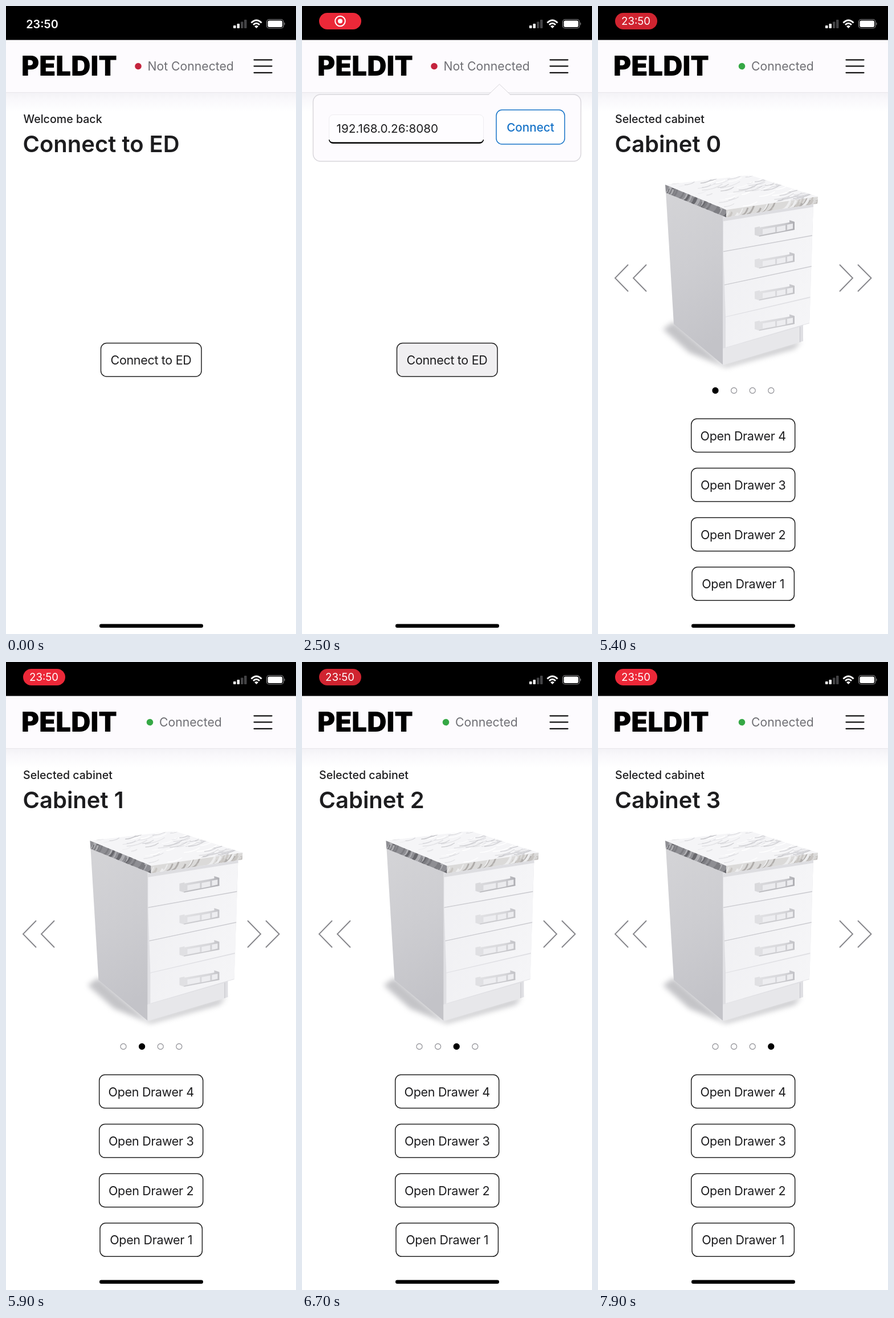
Animation of 509x1100 px, one loop 8 s. Source, as an HTML page:

```html
<!DOCTYPE html>
<html lang="en">
<head>
<meta charset="utf-8">
<title>Cabinet remote</title>
<style>
  html, body { margin: 0; width: 100%; height: 100%; overflow: hidden; background: #fff; }
  svg { display: block; font-family: Inter, Roboto, sans-serif; fill: #1d1d1f; }
  .small { font-size: 19.6px; font-weight: 500; }
  .title { font-size: 40px; font-weight: 600; }
  .label { font-size: 21.5px; letter-spacing: -.015em; text-anchor: middle; }
  .box { fill: #fff; stroke: #222; stroke-width: 1.5; }
  .line { fill: none; stroke: #86868b; stroke-width: 1.9; }
</style>
</head>
<body>
<svg width="509" height="1100" viewBox="0 0 509 1100">
  <defs>
    <linearGradient id="drop" x2="0" y2="1">
      <stop stop-color="#f3f2f6"/><stop offset=".35" stop-color="#f9f8fb"/><stop offset="1" stop-color="#fff"/>
    </linearGradient>
    <linearGradient id="side" x2=".2" y2="1">
      <stop stop-color="#d4d4d7"/><stop offset=".5" stop-color="#cdcdd1"/><stop offset="1" stop-color="#c3c3c8"/>
    </linearGradient>
    <linearGradient id="front" x2="1" y2=".3">
      <stop stop-color="#f0f0f3"/><stop offset="1" stop-color="#f5f5f7"/>
    </linearGradient>
    <linearGradient id="metal" x2="1">
      <stop stop-color="#dadadd"/><stop offset=".7" stop-color="#cacace"/><stop offset="1" stop-color="#adadb2"/>
    </linearGradient>
    <filter id="blur" x="-30%" y="-30%" width="160%" height="160%"><feGaussianBlur stdDeviation="5"/></filter>
    <clipPath id="topClip"><path d="M118 313L266 296L386 334L225 357Z"/></clipPath>
    <clipPath id="edgeClip"><path d="M225 357L386 334L385 346L225 370Z"/></clipPath>
    <clipPath id="leftClip"><path d="M118 313L225 357V370L119 327Z"/></clipPath>
    <g id="handle">
      <path d="M275 388L284 386V404L275 401Z" fill="#d9d9dc"/>
      <path d="M283 388L336 379V375L345 378V392L283 404Z" fill="url(#metal)"/>
      <path d="M289 391L311 387V396L289 400ZM314 387L329 384V393L314 396ZM332 383L342 381V390L332 392Z" fill="#ebebee"/>
      <path d="M283 403L345 391" stroke="#adadb2" fill="none"/>
    </g>
    <g id="cabinet">
      <path d="M114 566L133 553L219 627L358 586L345 600L224 633L160 607Z" fill="#9c9ca2" opacity=".6" filter="url(#blur)"/>
      <path d="M119 325L220 367V629L133 557Z" fill="url(#side)"/>
      <path d="M219 368L378 346L371 556L360 559V587L219 629Z" fill="#dfdfe3"/>
      <g fill="url(#front)">
        <path d="M220 371L378 348L376 401L220 430Z"/>
        <path d="M220 431L376 403L375 455L222 488Z"/>
        <path d="M222 489L374 457L373 509L224 544Z"/>
        <path d="M224 545L373 511L371 555L224 598Z"/>
      </g>
      <path d="M219 600L354 562V589L219 629Z" fill="#e7e7ea"/>
      <path d="M220 430L376 402M222 488.500L375 456M354.500 562V589" fill="none" stroke="#c6c6cb"/>
      <path d="M220 371L378 348V352L220 377Z" fill="#d5d5d9" opacity=".7"/>
      <g id="handles"></g>
      <path d="M118 313L266 296L386 334L225 357Z" fill="#f5f5f7"/>
      <path d="M225 357L386 334L385 346L225 370Z" fill="#dbdad9"/>
      <path d="M118 313L225 357V370L119 327Z" fill="#8e8e93"/>
      <g id="marble" fill="none"></g>
    </g>
  </defs>

  <rect width="509" height="1100" fill="#fff"/>

  <g id="home">
    <text class="small" x="30.500" y="205">Welcome back</text>
    <text class="title" x="29.500" y="256">Connect to ED</text>
    <rect id="connect" class="box" x="166.500" y="590.500" width="176.500" height="58.500" rx="10"/>
    <text class="label" x="254.500" y="628">Connect to ED</text>
  </g>

  <g id="panel">
    <text class="small" x="30" y="205">Selected cabinet</text>
    <text class="title" id="name" x="29.500" y="256"></text>
    <g id="slides"></g>
    <path class="line" d="M53 453L30 476.500L53 500M85 453L62 476.500L85 500M424 453L447 476.500L424 500M456 453L479.500 476.500L456 500"/>
    <g id="dots"></g>
    <g id="drawers"></g>
  </g>

  <rect y="152" width="509" height="33" fill="url(#drop)" style="mix-blend-mode:multiply"/>
  <rect y="59" width="509" height="92.500" fill="#fdfbfe"/>
  <path d="M0 151.500H509" stroke="#e8e6ea"/>
  <text x="27" y="122" font-size="47.500" font-weight="900" fill="#000">PELDIT</text>
  <circle id="lamp" cy="105.500" r="5.800"/>
  <text id="status" y="113" font-size="21.200" fill="#6f6f74"></text>
  <path d="M435.500 94.300H466.500M435.500 105.300H466.500M435.500 116.800H466.500" stroke="#111" stroke-width="2.300" stroke-linecap="round"/>

  <g id="popover">
    <rect x="19.500" y="155" width="470" height="117" rx="13" fill="#fdfbfe" stroke="#d9d7dc" stroke-width="1.500"/>
    <path d="M327 156L346.500 137L366 156V158H327Z" fill="#fdfbfe"/>
    <path d="M327 155.500L346.500 137L366 155.500" fill="none" stroke="#d9d7dc"/>
    <rect x="47.500" y="190.500" width="271" height="49" rx="7" fill="#fefdff" stroke="#efedf1"/>
    <path d="M47.500 234Q49 239 55 239H311Q317 239 318.500 234Q318 240.500 311 240.500H55Q48 240.500 47.500 234Z" fill="#000" stroke="#000"/>
    <text x="60.500" y="221.500" font-size="20.700">192.168.0.26:8080</text>
    <rect x="341" y="182" width="120" height="60" rx="10" fill="#fff" stroke="#1874c8" stroke-width="1.500"/>
    <text x="401" y="220" font-size="20.700" font-weight="500" fill="#1874c8" text-anchor="middle">Connect</text>
  </g>

  <rect width="509" height="59.500" fill="#000"/>
  <rect id="pill" x="30" y="12" width="74" height="29" rx="14.500"/>
  <text id="clock" text-anchor="middle" fill="#fff">23:50</text>
  <g id="record">
    <circle cx="67" cy="26.500" r="8.800" fill="none" stroke="#fff" stroke-width="2"/>
    <circle cx="67" cy="26.500" r="4" fill="#fff"/>
  </g>
  <g fill="#fff">
    <rect x="399" y="34" width="4.500" height="5" rx="1"/>
    <rect x="405.500" y="31" width="4.500" height="8" rx="1"/>
    <g fill="#434345">
      <rect x="412" y="27.500" width="4.500" height="11.500" rx="1"/>
      <rect x="418" y="24" width="4.500" height="15" rx="1"/>
    </g>
    <g fill="none" stroke="#fff" stroke-width="2.900">
      <path d="M430.500 29.500Q439.500 20.500 448.500 29.500M434 33Q439.500 27.500 445 33"/>
    </g>
    <path d="M436 35.500Q439.500 32.500 443 35.500L439.500 39Z"/>
    <rect x="457.500" y="23.500" width="29.500" height="15.500" rx="4.500" fill="none" stroke="#8a8a8c" stroke-width="1.200"/>
    <rect x="459.500" y="25.500" width="25.500" height="11.500" rx="2.800"/>
    <path d="M488.300 28.500Q491 31 488.300 34Z" fill="#8a8a8c"/>
  </g>
  <rect x="164" y="1082.500" width="182" height="6.500" rx="3.200" fill="#000"/>
</svg>
<script>
const $ = id => document.getElementById(id);
const LOOP = 8000, WIDTH = 509, SLIDE = 300;
const taps = [5690, 6490, 7290];
const states = [
  [0, 'Not Connected', 232, '#c4233d'],
  [3400, 'Connecting', 250, '#f5b914'],
  [4800, 'Connected', 252.5, '#35a845']
];
const range = (n, f) => Array.from({length: n}, (_, i) => f(i)).join('');
const clamp = v => Math.max(0, Math.min(1, v));
const show = (id, on) => $(id).style.display = on ? '' : 'none';

let seed = 7;
const rand = () => (seed = seed * 16807 % 2147483647) / 2147483647;

function veins(clip, count, point, dx, dy, colors, width) {
  return `<g clip-path="url(#${clip})">` + range(count, i => {
    const [x, y] = point(rand(), rand()), k = .4 + rand();
    return `<path d="M${x} ${y}q${dx * k * .6} ${dy * k * .1} ${dx * k} ${dy * k}"
      stroke="${colors[i % colors.length]}" stroke-width="${width * (.4 + rand())}"/>`;
  }) + '</g>';
}

$('marble').innerHTML =
  veins('topClip', 75, (u, v) => [118 + 148 * u + 112 * v, 313 - 17 * u + 42 * v], 26, -8, ['#d6d6da', '#e4e4e7', '#cacace', '#fff'], 1.3) +
  veins('edgeClip', 34, u => [220 + 165 * u, 371 - 23 * u], 12, -15, ['#b0adab', '#ededee', '#c9c6c3'], 3) +
  veins('leftClip', 28, u => [115 + 108 * u, 327 + 43 * u], 9, -15, ['#68686d', '#b0b0b4', '#7d7d82'], 4);
$('handles').innerHTML = [0, 56, 112, 165].map((y, i) =>
  `<use href="#handle" y="${y}" opacity="${i ? .7 : 1}"/>`).join('');
$('slides').innerHTML = range(4, i => `<use href="#cabinet" x="${i * WIDTH}"/>`);
$('dots').innerHTML = range(4, i => `<circle cx="${206 + 32.6 * i}" cy="673.5" r="5" stroke-width="1.3"/>`);
$('drawers').innerHTML = range(4, i => {
  const y = 723 + 86.6 * i, inset = i == 3 ? 1.3 : 0;
  return `<rect class="box" x="${163.7 + inset}" y="${y}" width="${182 - 2 * inset}" height="58.5" rx="10"/>
    <text class="label" x="254.7" y="${y + 37.5}">Open Drawer ${4 - i}</text>`;
});

// CSS "ease": cubic-bezier(.25, .1, .25, 1)
function ease(x) {
  let lo = 0, hi = 1, s;
  for (let i = 0; i < 20; i++) {
    s = (lo + hi) / 2;
    if (.75 * s * (1 - s) + s ** 3 < x) lo = s; else hi = s;
  }
  return .3 * s * (1 - s) ** 2 + 3 * s * s * (1 - s) + s ** 3;
}

function draw(t) {
  const [, label, x, color] = states.filter(s => t >= s[0]).pop();
  $('status').textContent = label;
  $('status').setAttribute('x', x + 16.5);
  $('lamp').setAttribute('cx', x);
  $('lamp').setAttribute('fill', color);

  const open = t >= 4800;
  show('home', !open);
  show('panel', open);
  $('connect').style.fill = t >= 1900 && t < 3700 ? '#f0eff1' : '#fff';
  $('popover').style.opacity = clamp((t - 1950) / 150) * clamp((3450 - t) / 150);

  const current = taps.filter(tap => t >= tap).length;
  const shift = taps.reduce((sum, tap) => sum + ease(clamp((t - tap) / SLIDE)), 0);
  $('name').textContent = 'Cabinet ' + current;
  $('slides').setAttribute('transform', `translate(${-shift * WIDTH})`);
  [...$('dots').children].forEach((dot, i) => {
    dot.setAttribute('fill', i == current ? '#000' : '#fff');
    dot.setAttribute('stroke', i == current ? '#000' : '#98989d');
  });

  const recording = t >= 500, icon = t >= 1200 && t < 3100;
  const dark = clamp(.5 + .8 * Math.cos((t - 5150) / 1800 * 2 * Math.PI));
  show('pill', recording);
  show('record', icon);
  show('clock', !icon);
  $('pill').setAttribute('fill', `rgb(${236 - 28 * dark},${40 - 4 * dark},${56 - 8 * dark})`);
  const clock = recording ? {x: 66.6, y: 33.3, 'font-size': 18.6, 'font-weight': 400}
                          : {x: 63.5, y: 39, 'font-size': 19.8, 'font-weight': 600};
  for (const key in clock) $('clock').setAttribute(key, clock[key]);
}

function frame() {
  draw(performance.now() % LOOP);
  requestAnimationFrame(frame);
}
frame();
</script>
</body>
</html>
```
